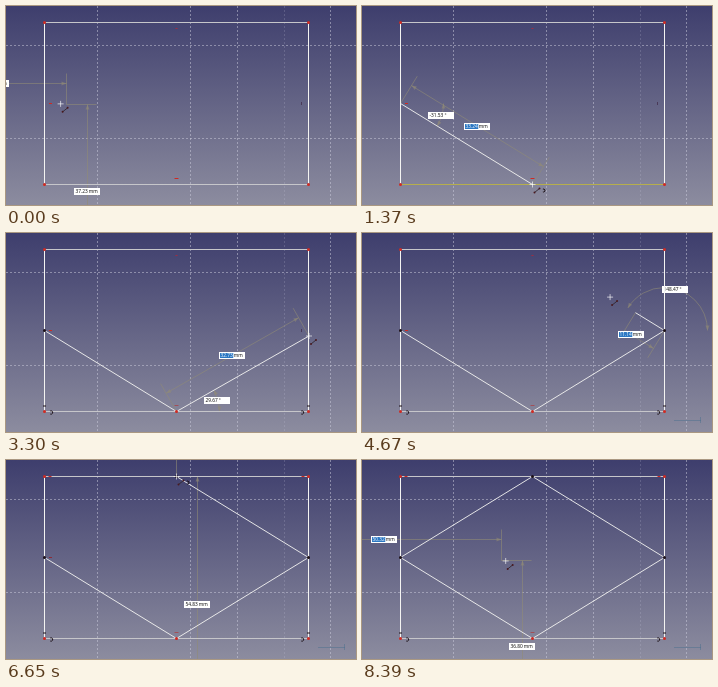
Animation of 350 by 199 pixels, one loop 8460 ms. Source, as an HTML page with a canvas:

```html
<!DOCTYPE html>
<html lang="en">
<head>
<meta charset="utf-8">
<title>Sketching a rhombus inside a rectangle</title>
<style>
html, body { margin: 0; width: 100%; height: 100%; overflow: hidden; background: #3e3e6c; }
canvas { display: block; width: 350px; height: 199px; }
</style>
</head>
<body>
<canvas id="stage"></canvas>
<script>
const W = 350, H = 199, LOOP = 8460, STEP = 70;
const canvas = document.getElementById('stage');
const g = canvas.getContext('2d');
const ratio = window.devicePixelRatio || 1;
canvas.width = Math.round(W * ratio);
canvas.height = Math.round(H * ratio);

const L = 38.5, R = 302.5, T = 16.5, B = 178.5;
const corners = [[L, T], [L, B], [R, B], [R, T]];
// Midpoints of the left, bottom, right and top edges
const nodes = corners.map(([x, y], i) => {
  const [x2, y2] = corners[(i + 1) % 4];
  return [(x + x2) / 2, (y + y2) / 2];
});
const [left, bottom, right, upper] = nodes;

const DIM = 'rgba(146,140,118,.58)', WHITE = '#f4f4f2', HOT = '#b6ae4c';
const RED = '#cf2a22', DARK = '#1c1016';
const OFFSET = 21, ARC = 43, MM = 0.2146, ORIGIN = [-95, 272];

// Line i runs from node i to the next: pressed at press[i], fixed at fix[i]
const press = [670, 2260, 4190, 6920];
const fix = [1570, 3570, 5430, 7830];

// Cursor travel: start, end, destination
const home = [60, 98];
const moves = [
  [-70, 450, left], [670, 1300, bottom], [2260, 3090, [303, 103]],
  [3300, 3370, right], [4530, 5130, upper], [6920, 7760, left],
  [7830, LOOP, [145, 101]]
];

const easeOut = p => 1 - (1 - p) ** 2;

function cursorAt(t) {
  let pos = home;
  for (const [start, end, to] of moves) {
    if (t < start) break;
    const steps = Math.floor((t - start) / STEP + 0.01);
    const k = t >= end ? 1 : easeOut(Math.min(1, steps * STEP / (end - start)));
    pos = [pos[0] + (to[0] - pos[0]) * k, pos[1] + (to[1] - pos[1]) * k];
  }
  return pos;
}

function line(a, b, color, width = 1) {
  g.strokeStyle = color;
  g.lineWidth = width;
  g.beginPath();
  g.moveTo(...a);
  g.lineTo(...b);
  g.stroke();
}

function arc([x, y], r, from, to, color, back = false) {
  g.strokeStyle = color;
  g.lineWidth = 1;
  g.beginPath();
  g.arc(x, y, r, from, to, back);
  g.stroke();
}

function dot([x, y], color, r = 1.5) {
  g.fillStyle = color;
  g.beginPath();
  g.arc(x, y, r, 0, 7);
  g.fill();
}

function arrow([x, y], angle) {
  g.save();
  g.translate(x, y);
  g.rotate(angle);
  g.fillStyle = DIM;
  g.beginPath();
  g.moveTo(0, 0);
  g.lineTo(-5, -2);
  g.lineTo(-5, 2);
  g.fill();
  g.restore();
}

function field(cx, cy, value, unit, selected) {
  const x = Math.floor(cx - 13.2), y = Math.round(cy - 3.5), label = value.toFixed(2);
  g.fillStyle = '#fff';
  g.fillRect(x, y, 26, 7);
  g.font = '4.8px "Open Sans", "Liberation Sans", sans-serif';
  g.textBaseline = 'middle';
  const w = g.measureText(label).width;
  if (selected) {
    g.fillStyle = '#2c78c4';
    g.fillRect(x + 1, y + 1, w + 1, 5);
  }
  g.fillStyle = selected ? '#fff' : '#000';
  g.fillText(label, x + 1.4, y + 3.7);
  g.fillStyle = '#000';
  g.fillText(unit, x + 2.6 + w, y + 3.7);
}

function background() {
  const fill = g.createLinearGradient(0, 0, 0, H);
  fill.addColorStop(0, '#3e3e6d');
  fill.addColorStop(1, '#8c8c9f');
  g.fillStyle = fill;
  g.fillRect(0, 0, W, H);
  g.setLineDash([2, 2]);
  const grid = 'rgba(205,205,222,.5)';
  for (const x of [91.5, 184.5, 231.5, 278.5, 324.5])
    line([x, 0], [x, H], x === 278.5 ? 'rgba(205,205,222,.2)' : grid);
  for (const y of [39.5, 132.5]) line([0, y], [W, y], grid);
  g.setLineDash([]);
}

function positionDims([px, py]) {
  const x = Math.floor(px) + 0.5, y = Math.floor(py) + 0.5;
  const dx = x + OFFSET, dy = y - OFFSET;
  line([x, y], [x, dy - 10], DIM);
  line([x, y], [dx + 9, y], DIM);
  line([0, dy], [x, dy], DIM);
  line([dx, y], [dx, H], DIM);
  arrow([x, dy], 0);
  arrow([dx, y], -Math.PI / 2);
  field(Math.max(-9, (x + ORIGIN[0]) / 2), dy, (x - ORIGIN[0]) * MM, 'mm', true);
  field(dx, (y + ORIGIN[1]) / 2, (ORIGIN[1] - y) * MM, 'mm', false);
}

function lineDims(a, end, cur) {
  const vx = end[0] - a[0], vy = end[1] - a[1], len = Math.hypot(vx, vy);
  if (len < 4) return;
  const angle = Math.atan2(vy, vx);
  const shift = (p, d) => [p[0] + vy / len * d, p[1] - vx / len * d];
  const onArc = turn => [a[0] + ARC * Math.cos(turn), a[1] + ARC * Math.sin(turn)];
  const p = shift(a, OFFSET), q = shift(end, OFFSET);
  line(a, shift(a, 32), DIM);
  line(end, shift(end, 32), DIM);
  line(p, q, DIM);
  arrow(p, angle + Math.PI);
  arrow(q, angle);

  const quarter = Math.sign(angle) * Math.PI / 2;
  arc(a, ARC, 0, angle, DIM, angle < 0);
  arrow(onArc(0), -quarter);
  arrow(onArc(angle), angle + quarter);

  // The length field runs slightly ahead of the drawn end
  const ahead = i => end[i] + (cur[i] - end[i]) * 0.6 - a[i];
  const ax = ahead(0), ay = ahead(1), reach = Math.hypot(ax, ay);
  field(a[0] + ax / 2 + ay / reach * OFFSET, a[1] + ay / 2 - ax / reach * OFFSET,
    reach * MM, 'mm', true);
  field(...onArc(angle / 2), -angle * 180 / Math.PI, '°', false);
}

function marks(t) {
  const dash = (x, y, color, w = 3) => line([x - w / 2, y], [x + w / 2, y], color);
  const [one, two, three, four] = fix.map(f => t >= f);
  corners.forEach(p => dot(p, RED));
  dash(170.5, 172.5, one ? '#a05058' : RED, 4);
  if (!three) dash(170.5, 22.5, '#a02c40', 2);
  if (!four) dash(44.5, 97.5, three ? '#8c2c38' : RED);
  if (!two) line([295.5, 96], [295.5, 99], '#4a3a58');
  if (one) {
    for (const x of [45, 296]) arc([x, 179.5], 1.7, -2, 2, DARK);
    for (const x of [L, R]) dash(x, 173, DARK);
    dot(left, DARK);
    dot(bottom, RED);
  }
  if (two) {
    dot(right, DARK);
    line([312, 187.5], [339, 187.5], 'rgba(70,110,140,.45)');
    line([338.5, 184], [338.5, 190], 'rgba(70,110,140,.45)');
  }
  if (three) {
    for (const x of [44, 297]) dash(x, T, RED);
    dot(upper, DARK);
  }
}

function pointer([x, y], snapped) {
  const white = 'rgba(255,255,255,.8)', ink = '#4a1a20';
  line([x - 3, y], [x + 3, y], white, 0.8);
  line([x, y - 3], [x, y + 3], white, 0.8);
  line([x + 2, y + 8], [x + 7, y + 4], '#302830', 0.9);
  dot([x + 2, y + 8], ink, 1);
  dot([x + 7, y + 4], ink, 1);
  if (snapped) arc([x + 11, y + 6], 1.5, -2, 2, DARK);
}

function draw(t) {
  const cur = cursorAt(t), end = cursorAt(t - STEP);
  const active = nodes.findIndex((_, i) => t >= press[i] && t < fix[i]);
  const near = p => Math.hypot(cur[0] - p[0], cur[1] - p[1]) < 2;
  g.setTransform(canvas.width / W, 0, 0, canvas.height / H, 0, 0);
  background();

  if (active < 0) positionDims(end);
  else lineDims(nodes[active], end, cur);

  // An edge lights up under the cursor until shortly after its line is fixed
  nodes.forEach((node, i) => {
    const hot = near(node) && t < fix[(i + 3) % 4] + 600;
    const plain = i % 2 ? '#c6c6ca' : WHITE;
    line(corners[i], corners[(i + 1) % 4], hot ? HOT : plain);
  });
  nodes.forEach((node, i) => {
    if (t >= fix[i]) line(node, nodes[(i + 1) % 4], WHITE, 0.9);
    else if (i === active) line(node, end, WHITE, 0.9);
  });
  marks(t);
  pointer(cur, nodes.some(near));
}

const begin = performance.now();
function frame() {
  draw((performance.now() - begin) % LOOP);
  requestAnimationFrame(frame);
}
frame();
</script>
</body>
</html>
```
